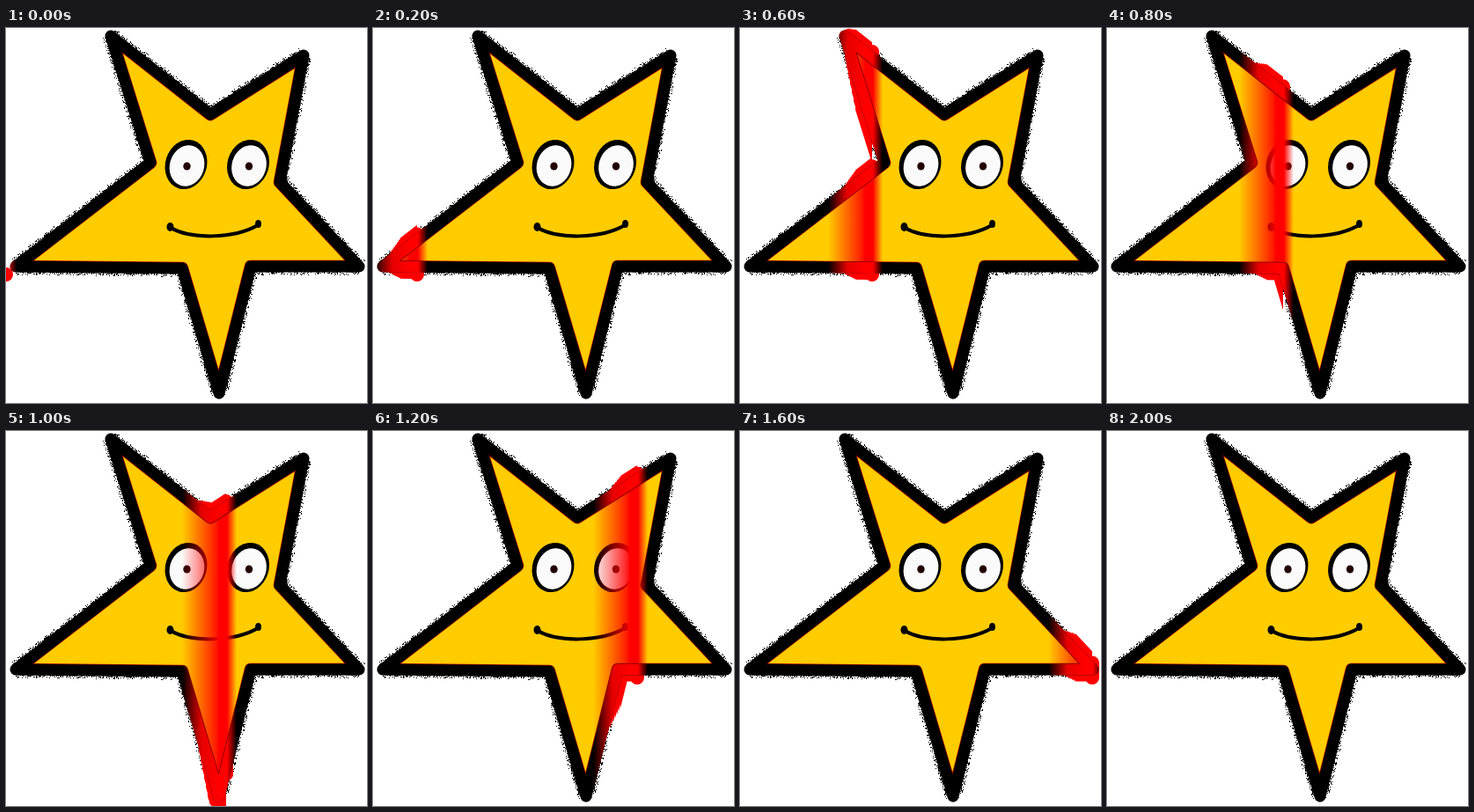
Write an HTML page with a canvas that moves like this. It is 410 px wide and 426 px high and loops after 2200 ms.

```html
<!DOCTYPE html>
<html>
<head>
<meta charset="utf-8">
<style>
  html, body { margin: 0; width: 100%; height: 100%; overflow: hidden; background: #fff; }
  canvas { display: block; }
</style>
</head>
<body>
<canvas id="stage" width="410" height="426"></canvas>
<script>
const W = 410, H = 426, STEP_MS = 200, STEPS = 11, STEP_PX = 50;
const PEN = 13, BRUSH = 16, FLOOR = 280;
const ctx = document.getElementById('stage').getContext('2d');

// Star corners, in the middle of the black line.
const corners = [
  [119, 9], [232, 98], [338, 31], [311, 175], [401, 271],
  [278, 271], [242, 415], [200, 273], [11, 271], [164, 153]
];
const edges = corners.map((from, i) => [from, corners[(i + 1) % corners.length]]);
const star = new Path2D();
corners.forEach(([x, y]) => star.lineTo(x, y));
star.closePath();

function seededRandom(seed) {
  return () => (seed = (seed * 16807) % 2147483647) / 2147483647;
}

// Chalky specks just outside the line.
function makeGrain() {
  const random = seededRandom(77), grain = new Path2D();
  for (const [[x1, y1], [x2, y2]] of edges) {
    const length = Math.hypot(x2 - x1, y2 - y1);
    for (let n = 0; n < length * 1.2; n++) {
      const t = random(), out = (PEN / 2 + 3 * random() ** 2) / length;
      const x = x1 + (x2 - x1) * t + (y2 - y1) * out;
      const y = y1 + (y2 - y1) * t - (x2 - x1) * out;
      grain.rect(Math.floor(x), Math.floor(y), 1, 1);
    }
  }
  return grain;
}
const grain = makeGrain();

function strokeStar(color, width) {
  ctx.strokeStyle = color;
  ctx.lineWidth = width;
  ctx.stroke(star);
}

function ellipse(x, y, rx, ry, tilt, color) {
  ctx.fillStyle = color;
  ctx.beginPath();
  ctx.ellipse(x, y, rx, ry, tilt, 0, Math.PI * 2);
  ctx.fill();
}

function drawEye(x, y) {
  ellipse(x, y, 23.5, 28.5, 0.3, '#000');
  ellipse(x + 1, y + 1.5, 19.5, 23.5, 0.3, '#fafafa');
  ellipse(x + 1, y + 2, 4.2, 4.5, 0, '#200');
}

function drawFace() {
  drawEye(204.5, 155);
  drawEye(275, 155);
  ctx.strokeStyle = '#000';
  ctx.lineWidth = 4;
  ctx.beginPath();
  ctx.moveTo(187, 227);
  ctx.bezierCurveTo(210, 240, 258, 240, 286, 224);
  ctx.stroke();
  ellipse(186.5, 226, 4, 5, 0, '#000');
  ellipse(286.5, 222.5, 3.5, 4.5, 0, '#000');
}

// Red that builds up, peaks at the bar and drops off quickly.
function redSweep(left, stops) {
  const gradient = ctx.createLinearGradient(left, 0, left + 62, 0);
  for (const [x, alpha] of [[0, 0], ...stops, [51, 1], [62, 0]]) {
    gradient.addColorStop(x / 62, `rgba(255,0,0,${alpha})`);
  }
  return gradient;
}

function crossings(x) {
  return edges
    .filter(([[x1], [x2]]) => (x1 <= x) !== (x2 <= x))
    .map(([[x1, y1], [x2, y2]]) => y1 + (y2 - y1) * (x - x1) / (x2 - x1))
    .sort((a, b) => a - b);
}

// Solid red outside the star: a rim that swells toward a round-capped bar.
function drawRim(left) {
  const barX = left + STEP_PX;
  for (let swell = 1; swell < BRUSH / 2; swell++) {
    ctx.save();
    ctx.beginPath();
    ctx.rect(left + 17 + swell * 2, 0, 33 - swell * 2, H);
    ctx.clip();
    strokeStar('#f00', PEN + swell * 2);
    ctx.restore();
  }
  const ys = crossings(barX), reach = PEN / 2;
  ctx.lineWidth = BRUSH;
  ctx.strokeStyle = '#f00';
  ctx.beginPath();
  ctx.moveTo(barX, FLOOR);
  ctx.lineTo(barX, FLOOR);
  for (let i = 0; i < ys.length; i += 2) {
    ctx.moveTo(barX, ys[i] - reach);
    ctx.lineTo(barX, ys[i + 1] + reach);
  }
  ctx.stroke();
}

function draw(now) {
  const step = Math.floor(now / STEP_MS) % STEPS;
  const left = (step - 1) * STEP_PX;
  ctx.fillStyle = '#fff';
  ctx.fillRect(0, 0, W, H);
  ctx.lineCap = ctx.lineJoin = 'round';

  ctx.fillStyle = '#000';
  ctx.fill(grain);
  drawRim(left);

  ctx.fillStyle = '#fc0';
  ctx.fill(star);
  drawFace();
  ctx.fillStyle = redSweep(left, [[38, 0.85], [42, 1]]);
  ctx.fill(star);

  ctx.save();
  ctx.clip(star);
  strokeStar('#900', PEN + 1.5);
  ctx.restore();
  strokeStar('#000', PEN);
  strokeStar(redSweep(left, [[22, 0.9], [42, 1]]), PEN);
}

const start = performance.now();
function tick() {
  draw(performance.now() - start);
  requestAnimationFrame(tick);
}
tick();
</script>
</body>
</html>
```
